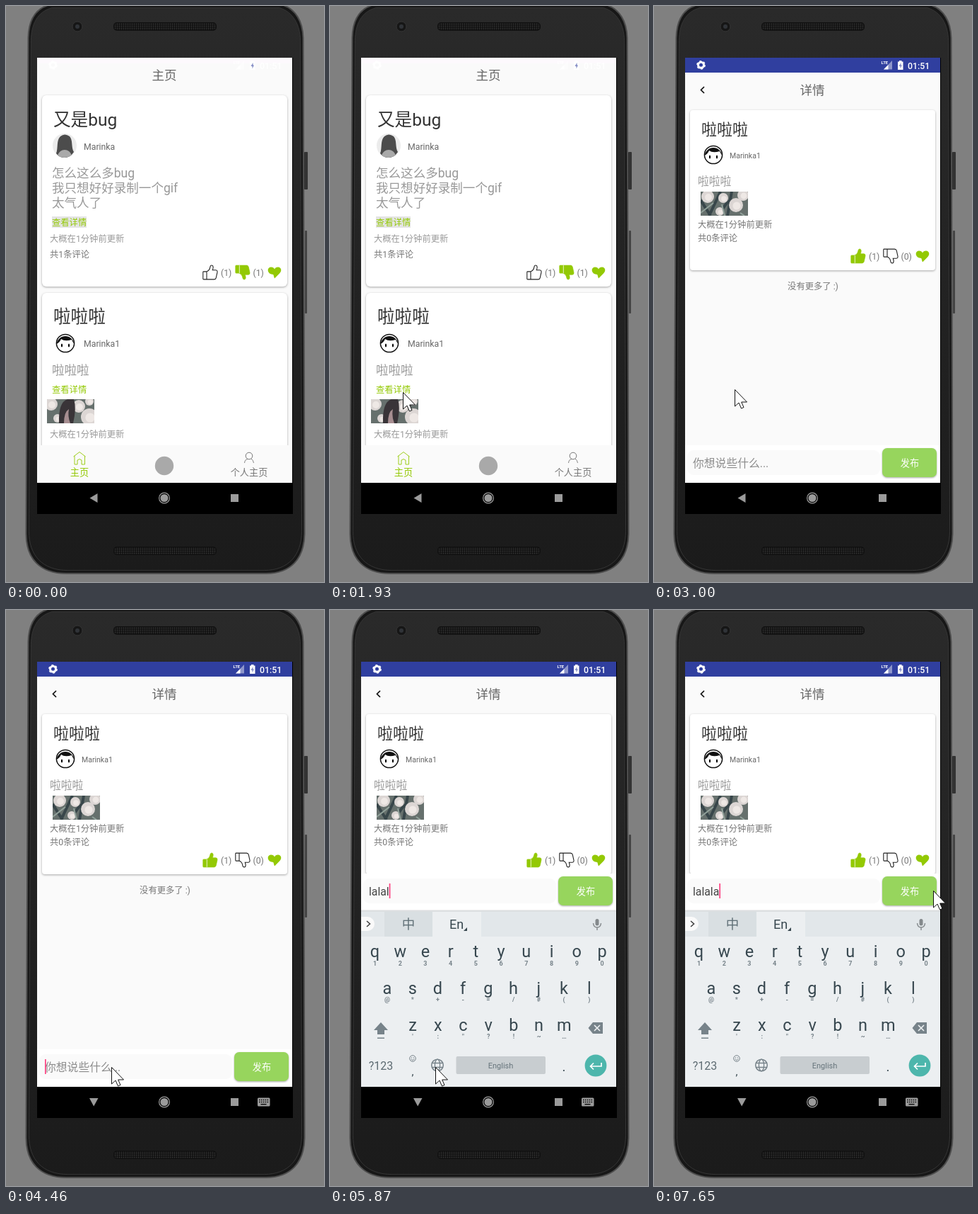
Animation, 450 px wide and 813 px high, one loop 8000 ms. Source, as an HTML page:

```html
<!DOCTYPE html>
<html lang="zh-CN">
<meta charset="utf-8">
<style>
  html, body { margin: 0; width: 100%; height: 100%; overflow: hidden; background: #808080 }
  svg { display: block; font-family: Roboto, 'Noto Sans CJK SC', 'Noto Sans CJK', sans-serif }
  text { white-space: pre }
  .card { fill: #fff; filter: drop-shadow(0 1px 1.5px #0005) }
</style>
<svg id="stage" width="450" height="813" viewBox="0 0 450 813"></svg>
<script>
const GREEN = '#93c904';
const stage = document.getElementById('stage');

// cy is the optical middle of the line
const text = (x, cy, size, str, fill = '#777', attrs = '') =>
  `<text x="${x}" y="${cy + size * .37}" font-size="${size}" fill="${fill}" ${attrs}>${str}</text>`;
const middle = (x, cy, size, str, fill, attrs = '') =>
  text(x, cy, size, str, fill, `text-anchor="middle" ${attrs}`);
const rect = (x, y, w, h, fill, attrs = '') =>
  `<rect x="${x}" y="${y}" width="${w}" height="${h}" fill="${fill}" ${attrs}/>`;
const circle = (x, y, r, fill, attrs = '') =>
  `<circle cx="${x}" cy="${y}" r="${r}" fill="${fill}" ${attrs}/>`;
const path = (d, fill = 'none', attrs = '') => `<path d="${d}" fill="${fill}" ${attrs}/>`;
const line = (d, stroke, width = 1.2) => path(d, 'none', `stroke="${stroke}" stroke-width="${width}"`);
const at = (x, y, body, more = '') => `<g transform="translate(${x} ${y}) ${more}">${body}</g>`;
const card = (y, h, r, id = '') =>
  `<rect ${id} class="card" x="51" y="${y}" width="347" height="${h}" rx="${r}"/>`;

function thumb(x, cy, flip, filled) {
  const hand = 'M6 9.6C9 8.5 10.6 5.5 11 2.6Q11.4 .6 13.2 .7C15.8 1 15.4 4.5 14.3 7.5H19Q21.4 7.8 21 10.5L19.2 18.5Q18.6 20.6 16.5 20.6H6Z';
  const cuff = 'M.8 10.4Q.8 9.6 1.6 9.6H6V20.6H1.6Q.8 20.6 .8 19.8Z';
  const look = filled ? `stroke="${GREEN}" stroke-width=".7"` : 'stroke="#222" stroke-width="1.1"';
  const shape = path(hand + cuff, filled ? GREEN : '#fff', look) +
    (filled ? line('M6.3 9.5V20.6', '#fff', .8) : '');
  return at(x, cy, shape, flip ? 'scale(1 -1) translate(0 -10.7)' : 'translate(0 -10.7)');
}

function reactions(cy, upOn, downOn, downCount) {
  return thumb(278, cy, false, upOn) + text(304, cy, 12.3, '(1)') +
    thumb(324, cy, true, downOn) + text(349.5, cy, 12.3, `(${downCount})`) +
    at(380, cy, path('M0 8.5C-3-.5 0 5-7 1.5C-11-2-9.5-7.5-5-7.5C-2.5-7.5-.8-6.2 0-4.6C.8-6.2 2.5-7.5 5-7.5C9.5-7.5 11-2 7 1.5L0 8.5L-7 1.5Z', GREEN));
}

const cartoonHead = (x, y) => at(x, y,
  circle(0, 0, 12.6, '#fff', 'stroke="#111" stroke-width="1.5"') +
  path('M-12.5 1A12.6 12.6 0 0 1 12.5 1Q10-2 9-5Q-1-2-6-6Q-8-1-12.5 1Z', '#111') +
  '<ellipse cx="-5" cy="3" rx="1.1" ry="2.5"/><ellipse cx="5" cy="3" rx="1.1" ry="2.5"/>');

const silhouette = (x, y) => at(x, y, circle(0, 0, 17, '#ececec') +
  path('M-12 11C-9 4-12-8-6-13Q0-18 7-13C12-8 9 3 13 9Q8 17 0 17Q-8 17-12 11Z', '#4c4c4c') +
  path('M-10 13.5Q-7 6 0 6Q7 6 10 13.5Q5 17 0 17Q-6 17-10 13.5Z', '#a9a9a9'));

const flower = (x, y, r) => circle(x, y, r, '#dcd6d4') + circle(x + 1, y + 1, r * .55, '#eee8e5');
const photo = (x, y, body) =>
  `<svg x="${x}" y="${y}" width="67" height="34">${rect(0, 0, 67, 34, '#66706d')}${body}</svg>`;

const girlPhoto = photo(58, 555,
  flower(6, 7, 9) + flower(15, 27, 6) + flower(45, 10, 9) + flower(60, 25, 12) + flower(60, 3, 6) +
  path('M17 34Q16 4 29 0H38Q42 12 37 34Z', '#393438') + path('M24 34Q24 18 31 14Q29 24 33 34Z', '#a78e91'));
const flowerPhoto = photo(66, 262,
  line('M12 34L28 0M24 34L40 12M0 12L14 34M44 0L38 34', '#38464a', 4) +
  flower(10, 7, 9) + flower(32, 9, 7) + flower(50, 19, 10) + flower(60, 5, 8) + flower(27, 28, 6) +
  line('M0 30L18 16M34 34L30 18M62 34L56 30', '#91a19a', 2));

const phonePath = 'M62-2C40 4 32 22 31.5 45L28.5 745C28.5 780 48 801 85 801H368C403 801 422 780 422.5 745L420.5 45C420 22 410 4 390-2Z';
const speaker = y => rect(152, y, 146, 12, '#111', 'rx="5"') + rect(153, y + 1, 144, 10, 'url(#mesh)', 'rx="5"');
const phone = `<defs>
    <pattern id="mesh" width="3" height="3" patternUnits="userSpaceOnUse">${circle(1.5, 1.5, .9, '#333')}</pattern>
    <linearGradient id="body" x2="0" y2="1"><stop stop-color="#2a2a2a"/><stop offset="1" stop-color="#1b1b1b"/></linearGradient>
  </defs>` +
  rect(422, 206, 5, 53, '#333', 'rx="1"') + rect(423, 317, 3, 117, '#444', 'rx="1"') +
  path(phonePath, '#171717', 'stroke="#4d4d4d" stroke-width="2"') +
  `<g transform="translate(225 400) scale(.98 .989) translate(-225 -400)">${path(phonePath, 'url(#body)', 'stroke="#363636"')}</g>` +
  circle(101, 29, 7, '#161616', 'stroke="#353535"') + circle(101, 29, 3, '#303338') +
  speaker(23) + speaker(763) + rect(44, 73, 362, 644, '#000');

const feedMeta = (cy, count) => text(62, cy, 12.3, '大概在1分钟前更新', '#999') +
  text(62, cy + 22, 12.3, `共${count}条评论`, '#777');
const feed = rect(44, 73, 361, 600, '#fafafa') + rect(44, 73, 361, 8, '#fdf9fd') +
  middle(224, 98, 17.56, '主页', '#666') +
  card(126, 270, 6) + text(67, 159.5, 24.6, '又是bug', '#333') +
  silhouette(83, 197) + text(110, 198.5, 12.3, 'Marinka', '#666') +
  ['怎么这么多bug', '我只想好好录制一个gif', '太气人了'].map((s, i) => text(65, 236 + i * 21, 17.56, s, '#999')).join('') +
  rect(65, 297, 49, 16, '#e4e4e4') + text(65, 305, 12.3, '查看详情', GREEN) +
  feedMeta(328.5, 1) + reactions(376, false, true, 1) +
  card(405, 260, 6) + text(67, 438, 24.6, '啦啦啦', '#333') +
  cartoonHead(84, 476) + text(110, 476.5, 12.3, 'Marinka1', '#666') +
  text(65, 514, 17.56, '啦啦啦', '#999') + text(65, 541.5, 12.3, '查看详情', GREEN) +
  girlPhoto + feedMeta(604.5, 0) +
  rect(44, 620, 361, 53, '#fafafa') +
  line('M95.500 636L104 629.500L112.500 636M97 635V647H101V641Q104 638 107 641V647H111.500V635', GREEN, .9) +
  middle(104, 658, 13.17, '主页', GREEN) + circle(224, 649, 13.2, '#a9a9a9') +
  circle(344, 635, 4.8, 'none', 'stroke="#777"') + line('M337.500 645Q338 640 342 639.500M347 639Q350 641 350.500 645', '#777', .9) +
  middle(344, 658, 13.17, '个人主页', '#777');

const detail = rect(44, 73, 361, 600, '#fafafa') + rect(44, 73, 361, 21, '#303f9f') +
  line('M71 114L66.500 118.500L71 123', '#111', 1.7) + middle(224, 118.5, 17.56, '详情', '#666') +
  card(147, 226, 4, 'id="post"') + text(67, 174, 21.95, '啦啦啦', '#333') +
  cartoonHead(84, 210) + text(107, 211, 10.54, 'Marinka1', '#666') +
  text(62, 247, 15.8, '啦啦啦', '#999') +
  `<g id="loaded">${flowerPhoto}${middle(225, 395, 12.3, '没有更多了 :)')}</g>
  <g id="meta">${text(62, 308, 12.3, '大概在1分钟前更新')}${text(62, 327.5, 12.3, '共0条评论')}${reactions(353, true, false, 0)}</g>
  <g id="composer">${rect(44, 620, 361, 53, '#fff')}${rect(47, 627, 273, 35, '#fafafa', 'rx="9"')}
    ${rect(323, 624, 77, 41, '#97d55d', 'rx="7" style="filter:drop-shadow(0 1px 1px #0005)"')}
    ${middle(362, 645, 13.17, '发布', '#fff')}
    ${text(55, 645, 15.8, '你想说些什么...', '#8c8c8c', 'id="hint"')}${text(55, 645.3, 15.8, '', '#444', 'id="typed"')}
    ${rect(55, 634, 1.7, 21, '#ff4081', 'id="caret"')}</g>`;

const KEY = '#37474f', DIM = '#77838a';
const keyRow = (x, y, letters, marks) => [...letters].map((c, i) =>
  middle(x + i * 35.72, y - 8.5, 23.5, c, KEY) + middle(x + i * 35.72, y + 8.5, 9, marks[i], DIM, 'font-weight="700"')).join('');
const keyboard = rect(44, 424, 361, 249, '#eceff1') + rect(44, 423, 361, 3, '#0001') +
  rect(44, 426, 361, 35, '#e2e7ea') + rect(77, 426, 68, 35, '#d9dfe2') + rect(145, 426, 69, 35, '#eceff1') +
  path('M44 433H53A10 10 0 0 1 53 453H44Z', '#fafafa') + line('M52 439L56.500 443L52 447', '#444', 1.6) +
  middle(111, 443, 18.5, '中', '#607077') + middle(179, 443, 18, 'En', KEY) + path('M194 448V453H189Z', KEY) +
  rect(375.5, 436, 5, 9.5, '#84898c', 'rx="2.5"') + line('M372.500 442Q373 448 378 448Q383 448 383.500 442M378 448V452', '#84898c', 1.4) +
  keyRow(63.5, 490, 'qwertyuiop', '1234567890') + keyRow(81, 541.5, 'asdfghjkl', '@*+-=/#()') +
  keyRow(117, 593.5, 'zxcvbnm', '\':"?!~…') +
  path('M72 582L82 593H77V599H67V593H62Z', DIM) + rect(67, 603.5, 10, 1.5, DIM) +
  path('M372 582H386V598H372L365.500 590Z', DIM) + line('M374 586L382 594M382 586L374 594', '#eceff1', 1.7) +
  middle(72, 643, 16, '?123', '#5d6b72') + circle(117, 633, 4.3, 'none', `stroke="${DIM}"`) +
  circle(115.5, 632, .7, DIM) + circle(118.5, 632, .7, DIM) + line('M114.500 634Q117 637 119.500 634', DIM, .9) +
  middle(117, 651.5, 15, ',', KEY) +
  circle(152, 642.5, 8.3, 'none', `stroke="${DIM}" stroke-width="1.5"`) +
  '<ellipse cx="152" cy="642.5" rx="3.6" ry="8.3" fill="none" stroke="#77838a" stroke-width="1.3"/>' +
  line('M144.500 639.500H159.500M144.500 645.500H159.500', DIM, 1.3) +
  rect(178.5, 630, 126.5, 25, '#c8cdd0', 'rx="2"') + middle(241.5, 643, 11, 'English', '#66747b') +
  middle(331, 644, 19, '.', KEY) + circle(376, 643, 15.4, '#4db6ac') +
  line('M384 639V644H369M373 639.500L368.500 644L373 648.500', '#fff', 1.7);

const statusIcons = circle(66.5, 83.3, 4, 'none', 'stroke="#fff" stroke-width="3"') +
  circle(66.5, 83.3, 5.6, 'none', 'stroke="#fff" stroke-width="1.6" stroke-dasharray="2.9 2.96"') +
  text(321.5, 80, 6, 'LTE', '#fff', 'font-weight="700"') + path('M337 77V89.500H325Z', '#fff', 'opacity=".45"') +
  path('M331.500 83V89.500H325Z', '#fff') +
  path('M345 78.500H347V77H350.500V78.500H352.500V90H345Z', '#fff') + path('M349.500 80L346.500 85H348.500V88.500L351 83.500H349.500Z', '#303f9f', 'opacity=".6"') +
  text(359, 84, 12.3, '01:51', '#fff', 'font-weight="500"');

const navIcons = path('', '#9b9b9b', 'id="back"') +
  circle(224, 694.5, 7.4, 'none', 'stroke="#9b9b9b" stroke-width="1.2"') + circle(224, 694.5, 5.5, '#9b9b9b') +
  rect(318, 689, 11, 11, '#9b9b9b') +
  `<g id="imeIcon">${rect(356, 688.5, 17.5, 12, '#9b9b9b', 'rx="1.5"')}
    ${path('M358 691.500H372M358 694.500H372', 'none', 'stroke="#000" stroke-width="1.5" stroke-dasharray="1.5 1.4"')}${rect(360.5, 697, 8, 1.3, '#000')}</g>`;

const pointer = path('M.5 .5V24L6 19L9.500 27L13 25.500L9.700 18H17.500Z', '#fff', 'stroke="#111" stroke-linejoin="round"');

stage.innerHTML = phone + `<g id="feed">${feed}</g>` + rect(44, 73, 361, 18, '#000', 'id="dim"') +
  `<g id="detail">${detail}</g><g id="keyboard">${keyboard}</g>` + statusIcons + navIcons + `<g id="pointer">${pointer}</g>`;

const $ = id => document.getElementById(id);
const show = (id, on) => $(id).setAttribute('display', on ? 'inline' : 'none');
const move = (id, x, y) => $(id).setAttribute('transform', `translate(${x} ${y})`);
const ramp = (t, start, length) => Math.min(1, Math.max(0, (t - start) / length));

// time, x, y of the pointer tip
const route = [
  [380, 134, 713], [460, 100, 682], [610, 72, 622], [760, 85, 580], [840, 87, 576], [1150, 103, 546], [1220, 103, 545],
  [2900, 103, 545], [3000, 114, 541], [3080, 116, 542], [3230, 158, 568], [3400, 166, 592], [3850, 149, 645],
  [6900, 149, 645], [7040, 300, 520], [7110, 391, 395], [7300, 391, 395], [7420, 431, 386], [7650, 395, 396]];
const keyTimes = [5310, 5480, 5550, 5720, 5870, 6650];
const caretSpans = [[4230, 4770], [5310, 6340], [6650, 7110], [7650, 8000]];

function pointerAt(t) {
  const next = route.findIndex(k => k[0] > t);
  if (next < 0) return route.at(-1).slice(1);
  const [t0, x0, y0] = route[next - 1], [t1, x1, y1] = route[next], p = (t - t0) / (t1 - t0);
  return [x0 + (x1 - x0) * p, y0 + (y1 - y0) * p];
}

function draw(t) {
  show('pointer', t >= 380);
  if (t >= 380) move('pointer', ...pointerAt(t));

  // page enters with a fade and a short decelerating rise
  const rise = 51 * (1 - ramp(t, 2391, 350)) ** 5;
  show('detail', t >= 2460);
  $('detail').setAttribute('opacity', 1 - (1 - ramp(t, 2391, 200)) ** 4);
  move('detail', 0, rise);
  show('dim', t >= 2460 && t < 2741);
  $('dim').setAttribute('opacity', .09);
  show('feed', t < 2741);

  const loaded = t >= 2780;
  show('loaded', loaded);
  $('post').setAttribute('height', loaded ? 226 : 192);
  move('meta', 0, loaded ? 0 : -34.5);

  move('composer', 0, t >= 4620 ? -248 : 0);
  const typed = 'lalala'.slice(0, keyTimes.filter(k => t >= k).length);
  $('typed').textContent = typed;
  show('hint', !typed);
  $('caret').setAttribute('x', 55 + (typed && $('typed').getComputedTextLength()));
  show('caret', caretSpans.some(([on, off]) => t >= on && t < off));

  const enter = ramp(t, 4770, 230);
  show('keyboard', t >= 4770);
  $('keyboard').setAttribute('opacity', .35 + .65 * enter);
  move('keyboard', 0, 24 * (1 - enter) ** 2);
  show('imeIcon', t >= 4460);
  $('back').setAttribute('d', t >= 4460 ? 'M118 689H130.500L124.200 700.500Z' : 'M118.500 694.500L129.500 688V701Z');
}

const start = performance.now();
function tick() {
  draw((performance.now() - start) % 8000);
  requestAnimationFrame(tick);
}
tick();
</script>
</html>
```
